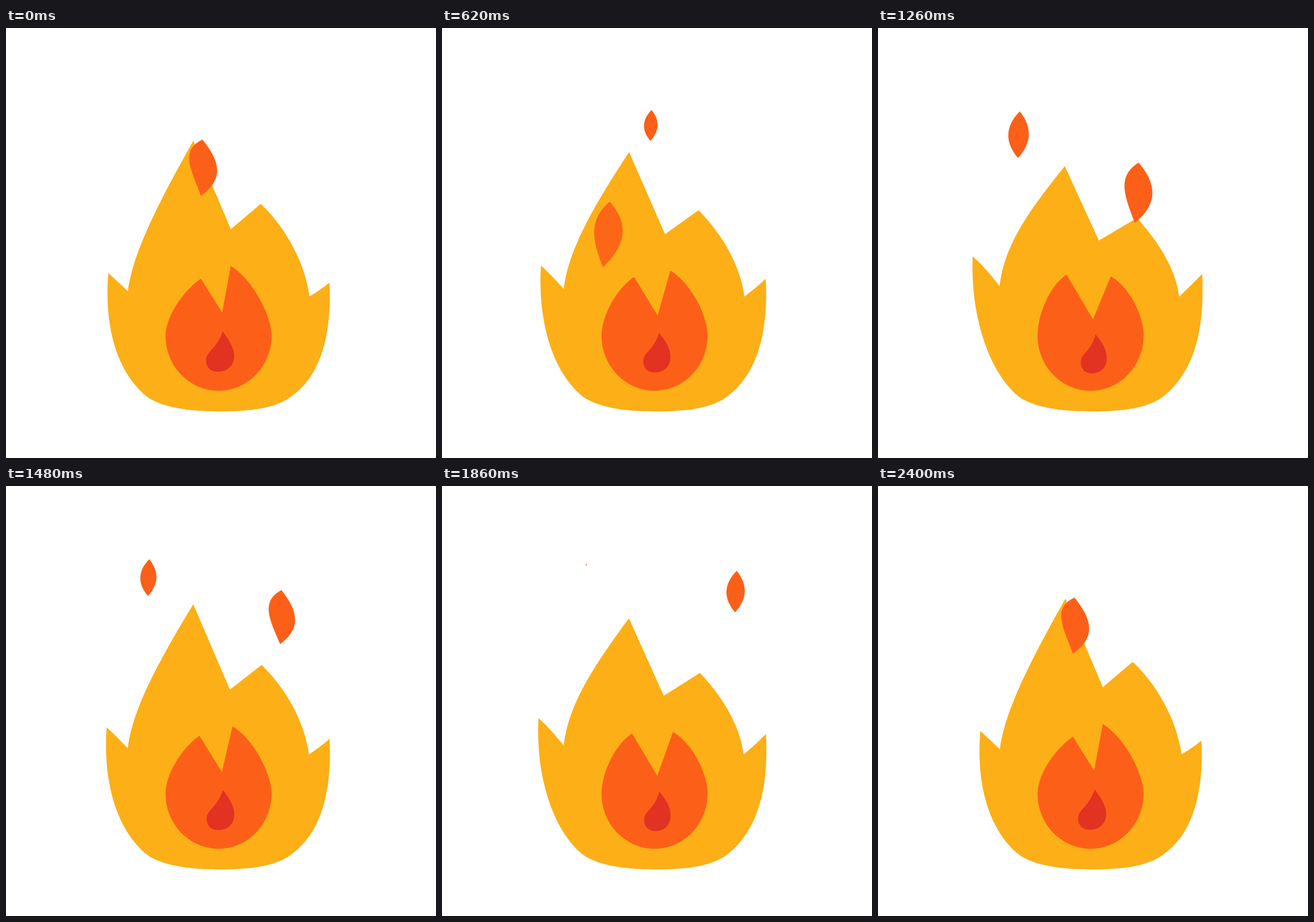
These frames come from a looping animation (748 px wide and 748 px high, 2420 ms). An HTML page:

```html
<!DOCTYPE html>
<html lang="en">
<head>
<meta charset="utf-8">
<title>Campfire</title>
<style>
html, body { margin: 0; width: 100%; height: 100%; overflow: hidden; background: #fff; }
svg { display: block; width: 100%; height: 100%; }
</style>
</head>
<body>
<svg viewBox="0 0 748 748">
  <path id="body" fill="#fcaf17"/>
  <path id="core" fill="#fc6018"/>
  <path id="heart" fill="#e13222"/>
  <g id="sparks" fill="#fc6018"><path/><path/><path/></g>
</svg>
<script>
const LOOP = 2420, CYCLE = 2400, STEP = 20, FLICKER = 800;
const LIFE = 1440, FADE = 200, LEAF_AT = 520, LENS_AT = 820;

// Each layer morphs between a tall and a low pose with the same commands.
const layers = {
  body: [
    `M178 426 C189 436.5 200.5 447 212 458 C220 390 270 295 326 196 L391 350 L443 306
     C485 345 519 405 528 467 C541 459 553 451 562.5 443 C567 520 552 600 500 638
     C472 662 425 667 370 667 C318 667 265 660 240 637 C188 590 171 510 178 426Z`,
    `M164 395.5 C181 410 199 432 211.5 448.5 C220 375 262 320 324.8 242.8 L383.8 370.8 L451 332
     C485 371 517 415 523.6 467.5 C537 454.5 550.5 441.5 564 427 C568 515 555 590 500 638
     C472 662 425 667 370 667 C318 667 265 660 240 637 C188 590 160 490 164 395.5Z`
  ],
  core: [
    `M339 436 L376 495 L391 414 C432 440 462 503 462 535 C462 588 421 631 370 631
     C319 631 277.5 588 277.5 535 C277.5 505 305 460 339 436Z`,
    `M327.4 428.6 L373.9 507.7 L405.8 433 C438 451 462 500 462 535 C462 588 421 631 370 631
     C319 631 277.5 588 277.5 535 C277.5 500 298 447 327.4 428.6Z`
  ],
  heart: [
    `M377 528 C390 545 397 558 397 571 C397 588 384 598 368 598
     C356 598 348 590 348 579 C348 562 365 561 377 528Z`,
    `M378.6 533.3 C391 548 398 560 398 574 C398 592 386 601 373 601
     C360 601 353 593 353 582 C353 565 370 566 378.6 533.3Z`
  ]
};

// A spark is born as a bent leaf, straightens, then becomes a shrinking lens.
const bent = "M6 -57 C39 -20 36 17 -6 57 C-24 10 -32 -25 6 -57Z";
const leaf = "M1 -48.5 C26 -17 45 17 -1 48.5 C-19 0 -38 -30 1 -48.5Z";
const lens = "M1.5 -40.5 C23 -14 23 14 -1.5 40.5 C-24.5 14 -24.5 -14 1.5 -40.5Z";

// Points passed at equal intervals of a spark's life
const sparks = [
  { born: 1900, path: [[356, 410], [339, 280], [348, 200], [362.5, 171.5], [368, 157]] },
  { born: 440, path: [[324, 440], [255, 287], [245, 202], [248.5, 155.5], [251, 136]] },
  { born: 900, path: [[466, 394], [450, 286.5], [497, 200], [515, 178], [517, 148]] }
];

const el = id => document.getElementById(id);
const mix = (a, b, k) => a + (b - a) * k;
const ramp = (v, from, to) => Math.min(1, Math.max(0, (v - from) / (to - from)));

function morph(a, b, k) {
  const number = /-?[\d.]+/g, ends = b.match(number);
  let n = 0;
  return a.replace(number, v => mix(+v, +ends[n++], k).toFixed(2));
}

// Catmull-Rom curve through evenly spaced points, u from 0 to 1
function along(points, u) {
  const last = points.length - 1;
  const i = Math.min(last - 1, Math.floor(u * last));
  const k = u * last - i, r = 1 - k;
  return [0, 1].map(c => {
    const slope = n => {
      const lo = Math.max(n - 1, 0), hi = Math.min(n + 1, last);
      return (points[hi][c] - points[lo][c]) / (hi - lo);
    };
    return points[i][c] * (1 + 2 * k) * r * r + slope(i) * k * r * r
         + points[i + 1][c] * (1 + 2 * r) * k * k - slope(i + 1) * k * k * r;
  });
}

function sparkShape(age) {
  return age < LEAF_AT
    ? morph(bent, leaf, ramp(age, 180, LEAF_AT))
    : morph(leaf, lens, ramp(age, LEAF_AT, LENS_AT));
}

function drawSpark(node, age, path) {
  const alive = age < LIFE;
  node.setAttribute("opacity", alive ? ramp(age, 0, FADE) : 0);
  if (!alive) return;
  const size = 1 - ramp(age, LENS_AT, LIFE) ** 1.5;
  node.setAttribute("d", sparkShape(age));
  node.setAttribute("transform", `translate(${along(path, age / LIFE)}) scale(${size})`);
}

function draw(now) {
  const t = Math.floor(now % LOOP / STEP) * STEP % CYCLE;
  const flicker = (1 - Math.cos(2 * Math.PI * t / FLICKER)) / 2;
  for (const id in layers) el(id).setAttribute("d", morph(...layers[id], flicker));
  sparks.forEach(({ born, path }, i) =>
    drawSpark(el("sparks").children[i], (t - born + CYCLE) % CYCLE, path));
}

const start = performance.now();
function tick() {
  draw(performance.now() - start);
  requestAnimationFrame(tick);
}
tick();
</script>
</body>
</html>
```
